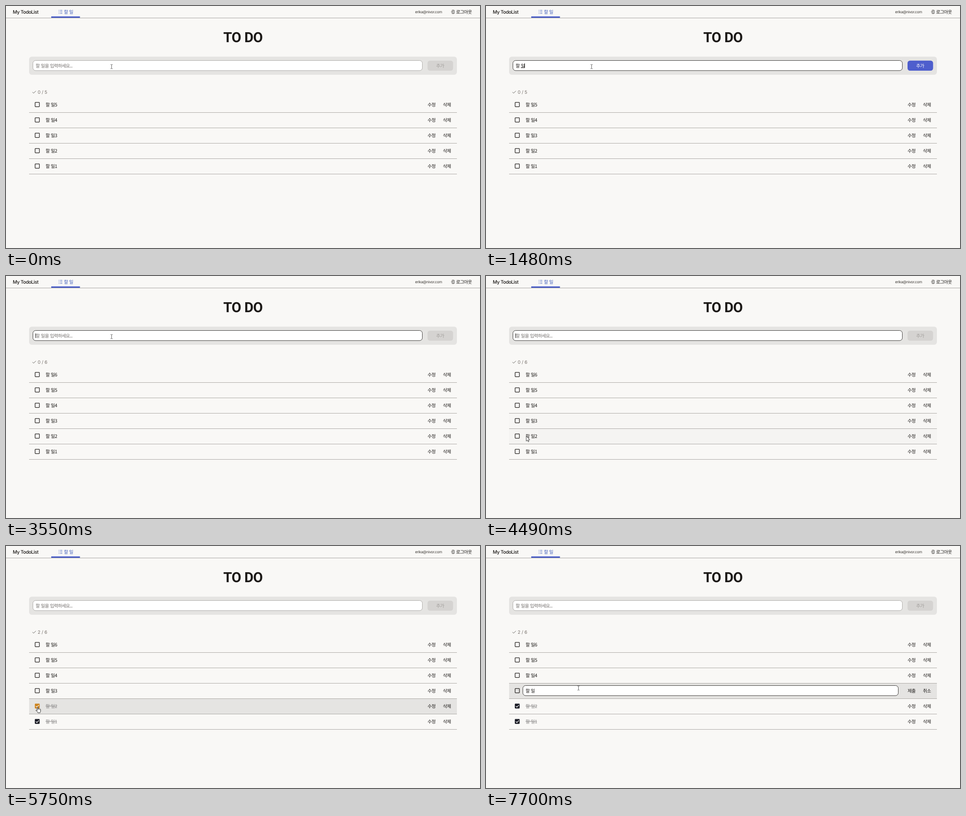
Recreate the animation shown at these times as an HTML page. Size 1048 px wide and 535 px high, loop 8 s.

```html
<!DOCTYPE html>
<html lang="ko">
<head>
<meta charset="utf-8">
<title>TO DO</title>
<style>
  html, body { margin: 0; width: 100%; height: 100%; overflow: hidden; background: #f9f8f6; }
  svg { display: block; width: 100vw; height: 100vh; }
  text {
    font: 400 10.3px "Noto Sans CJK KR", "Noto Sans CJK", "Noto Sans KR", sans-serif;
    letter-spacing: -.8px; word-spacing: .8px; fill: #1c1917; white-space: pre;
    text-rendering: geometricPrecision;
  }
  .brand { font: 500 10.6px Inter, sans-serif; letter-spacing: -.5px; word-spacing: 0; }
  .mail { font: 400 8.3px Inter, sans-serif; letter-spacing: -.4px; fill: #44403c; }
  .title { font: 700 31px Roboto, sans-serif; letter-spacing: -.5px; word-spacing: 0; }
  .count { font: 400 10px Inter, sans-serif; letter-spacing: -.1px; word-spacing: 0; fill: #78716c; }
  .tab { fill: #4260bd; }
  .hint { fill: #75716e; }
  .done { text-decoration: line-through; }
  .icon { fill: none; stroke-width: .95; }
  .box { fill: #fff; stroke-width: .85; }
</style>
</head>
<body>
<svg viewBox="0 0 1048 535">
  <text class="brand" x="15" y="16.8">My TodoList</text>
  <path class="icon" stroke="#4260bd" d="M116.500 9.500h1.500M116.500 12.900h1.500M116.500 16.300h1.500M119.500 9.500h5M119.500 12.900h5M119.500 16.300h5"/>
  <text class="tab" x="128" y="16.700">할 일</text>
  <path fill="#a5a3a0" d="M0 26h1048v1H0z"/>
  <path fill="#4a5dc9" d="M100 23h63.500v3h-63.500z"/>
  <text class="mail" x="904.500" y="15.600">erika@nivor.com</text>
  <path class="icon" stroke="#1c1917" d="M986.300 10.800V9.300h4.400v7.400h-4.400V15.200M984 13h4.300M987 11.700l1.300 1.300l-1.300 1.300"/>
  <text x="995" y="16.700">로그아웃</text>
  <text class="title" x="480.500" y="80">TO DO</text>

  <rect x="51" y="112" width="946" height="40" rx="6" fill="#e5e4e2"/>
  <rect id="field" class="box" x="59.500" y="120.500" width="861" height="22.300" rx="6"/>
  <text id="hint" class="hint" x="65.500" y="136">할 일을 입력하세요...</text>
  <text id="entry" x="65.500" y="136"></text>
  <path id="compose" stroke="#1c1917"/>
  <path id="caret" stroke="#1c1917"/>
  <rect id="add" x="932" y="120.700" width="56.500" height="22.300" rx="5.500"/>
  <text id="addText" x="951" y="136">추가</text>

  <path class="icon" stroke="#57534e" d="M58.500 190.300l2.500 2.500l5-5"/>
  <text id="count" class="count" x="70" y="193.700"></text>
  <g id="list"></g>

  <g id="edit">
    <rect id="editField" class="box" x="81.500" y="308.500" width="830" height="22.300" rx="6"/>
    <text id="editText" x="87.500" y="324"></text>
    <path id="editCaret" stroke="#1c1917"/>
  </g>

  <g id="pointer">
    <path data-kind="beam" fill="none" stroke="#333" stroke-width=".8" d="M-1.800-4.600h1.500l.8.600l.8-.600h1.500M.5-4v8M-1.800 4.600h1.500l.8-.600l.8.600h1.500"/>
    <path data-kind="arrow" fill="#fff" stroke="#111" stroke-width=".8" d="M0 0v11l2.600-2.300l1.700 3.800l1.700-.8l-1.700-3.600h3.500z"/>
    <path data-kind="hand" fill="#fff" stroke="#111" stroke-width=".9" stroke-linejoin="round"
      d="M-1 1q0-1 1-1t1 1v4q0-.9.900-.9t1 .9q.1-.8 1-.8t1 1q.1-.6.800-.6t.8.900v3.500q0 1.800-1.300 2.600v1.200h-4.600v-1.200L-3.600 8q-.6-1 .2-1.400t1.500.4L-1 8z"/>
  </g>
</svg>
<script>
const LOOP = 8000, SAVED = 3300, EDIT = 7030, FOCUS = 7520, ERASE = 7700;
const INK = [28, 25, 23], GREY = [160, 157, 154], BLUE = [78, 94, 205], ORANGE = [231, 146, 28];
const OFF = [213, 211, 209], OFF_TEXT = [160, 157, 154], WHITE = [255, 255, 255];
const PAGE = [249, 248, 246], HOVER = [229, 228, 226], MUTED = [139, 138, 138], NAVY = [23, 24, 34];

// [time, text, length of the committed part]
const typing = [
  [0, '', 0], [950, 'ㅎ', 0], [1030, '하', 0], [1110, '할', 0], [1180, '할 ', 2],
  [1340, '할 ㅇ', 2], [1410, '할 이', 2], [1480, '할 일', 2], [2370, '할 일6', 4], [3160, '', 0]
];
const blinks = [[30, 540], [950, 2020], [2370, 2910], [3440, 3960], [4490, 4770]];
const checks = { 1: 4950, 2: 5580 };
const counts = [5130, 5750];

// [time, x, y, easing towards this point]
const linear = p => p, easeIn = p => p * p, easeOut = p => 1 - (1 - p) ** 2;
const easeBoth = p => p * p * (3 - 2 * p);
const track = [
  [0, 233, 134], [3930, 233, 134], [4250, 150, 255, easeIn], [4720, 70, 385, easeOut],
  [4950, 70, 381, easeBoth], [5200, 70, 381], [5540, 70, 356, easeBoth], [6160, 70, 356],
  [6640, 700, 342, easeIn], [6770, 942, 322, easeOut], [7060, 942, 322],
  [7480, 204, 314, easeBoth], [LOOP, 204, 314]
];

const $ = id => document.getElementById(id);
const clamp = v => Math.min(1, Math.max(0, v));
const ramp = (t, start, span = 150) => clamp((t - start) / span);
const mix = (a, b, p) => `rgb(${a.map((v, i) => Math.round(v + (b[i] - v) * p))})`;
const show = (el, on) => el.setAttribute('visibility', on ? 'inherit' : 'hidden');
const write = (el, s) => { if (el.textContent !== s) el.textContent = s; };

function mouse(t) {
  const i = Math.max(1, track.findIndex(k => k[0] > t));
  const [t0, x0, y0] = track[i - 1], [t1, x1, y1, ease = linear] = track[i];
  const p = ease((t - t0) / (t1 - t0));
  return { x: x0 + (x1 - x0) * p, y: y0 + (y1 - y0) * p };
}

const rowAt = ({ y }) => 6 - Math.floor((y - 202) / 34);
const onBox = m => m.x > 62 && m.x < 76;

// Hover amount that rises and falls at a constant rate.
function hover(t, span, test) {
  let v = 0;
  for (let s = 3900; s < t; s += 10) v = clamp(v + (test(mouse(s)) ? 10 : -10) / span);
  return v;
}

function pointerKind({ x, y }, t) {
  const inField = y > 120 && y < 143 && x > 59 && x < 921;
  const inEdit = t > EDIT && y > 308 && y < 331 && x > 81 && x < 912;
  if (inField || inEdit) return 'beam';
  return y > 205 && (x < 76 || x > 930) ? 'hand' : 'arrow';
}

const rows = [6, 5, 4, 3, 2, 1].map(n => {
  const g = document.createElementNS('http://www.w3.org/2000/svg', 'g');
  g.innerHTML = `<rect x="51" y="202" width="946" height="33"/>
    <path fill="#aba8a5" d="M51 235h946v1H51z"/>
    <rect x="64.400" y="213.200" width="9.400" height="9.400" rx=".8" stroke-width="1.250"/>
    <path fill="none" stroke="#fff" stroke-width="1.300" d="M66 218l2.300 2.300l4.500-4.700"/>
    <text x="87.500" y="222">할 일${n}</text>
    <text x="932" y="222">수정</text><text x="966" y="222">삭제</text>`;
  $('list').append(g);
  const [bg, , box, tick, label, left, right] = g.children;
  return { n, g, bg, box, tick, label, left, right };
});

function drawRow(r, t, total) {
  const start = checks[r.n], done = t >= start, editing = r.n === 3 && t >= EDIT;
  r.g.setAttribute('transform', `translate(0 ${(total - r.n) * 34})`);
  show(r.g, r.n <= total);
  r.bg.style.fill = mix(PAGE, HOVER, hover(t, 300, m => rowAt(m) === r.n));
  const glow = done
    ? Math.min(ramp(t, start + 40), hover(t, 150, m => rowAt(m) === r.n && onBox(m))) : 0;
  const tone = mix(done ? NAVY : INK, ORANGE, glow);
  r.box.style.stroke = tone;
  r.box.style.fill = done ? tone : 'none';
  show(r.tick, done);
  r.label.classList.toggle('done', done);
  r.label.style.fill = mix(INK, MUTED, done ? ramp(t, start + 20) : 0);
  show(r.label, !editing);
  write(r.left, editing ? '제출' : '수정');
  write(r.right, editing ? '취소' : '삭제');
}

// Keeps a caret on one pixel column.
const column = x => Math.floor(x) + .5;

function drawInput(t) {
  const [, text, kept] = typing.filter(k => k[0] <= t).pop();
  const entry = $('entry');
  write(entry, text);
  show($('hint'), !text);
  const width = n => n ? entry.getSubStringLength(0, n) : 0;
  const end = 65.5 + width(text.length);
  $('caret').setAttribute('d', `M${column(end)} 127v10`);
  show($('caret'), blinks.some(([a, b]) => t >= a && t < b));
  $('compose').setAttribute('d', `M${65.5 + width(kept)} 136.500H${end}`);
  show($('compose'), kept < text.length);
  $('field').style.stroke = mix(GREY, INK, ramp(t, 30) - ramp(t, 4770));
  const on = ramp(t, 950) - ramp(t, 3160, 200);
  $('add').style.fill = mix(OFF, BLUE, on);
  $('addText').style.fill = mix(OFF_TEXT, WHITE, on);
}

function drawEdit(t) {
  show($('edit'), t >= EDIT);
  write($('editText'), t < ERASE ? '할 일3' : '할 일');
  $('editField').style.stroke = mix(GREY, INK, ramp(t, FOCUS));
  const end = 87.5 + $('editText').getComputedTextLength();
  $('editCaret').setAttribute('d', `M${column(end)} 315v10`);
  show($('editCaret'), t >= FOCUS && t < ERASE);
}

function draw(now) {
  const t = now % LOOP, total = t < SAVED ? 5 : 6, m = mouse(t);
  drawInput(t);
  write($('count'), `${counts.filter(c => t >= c).length} / ${total}`);
  rows.forEach(r => drawRow(r, t, total));
  drawEdit(t);
  $('pointer').setAttribute('transform', `translate(${m.x.toFixed(1)} ${m.y.toFixed(1)})`);
  const kind = pointerKind(m, t);
  for (const p of $('pointer').children) show(p, p.dataset.kind === kind);
}

function tick() {
  draw(performance.now());
  requestAnimationFrame(tick);
}
tick();
</script>
</body>
</html>
```
